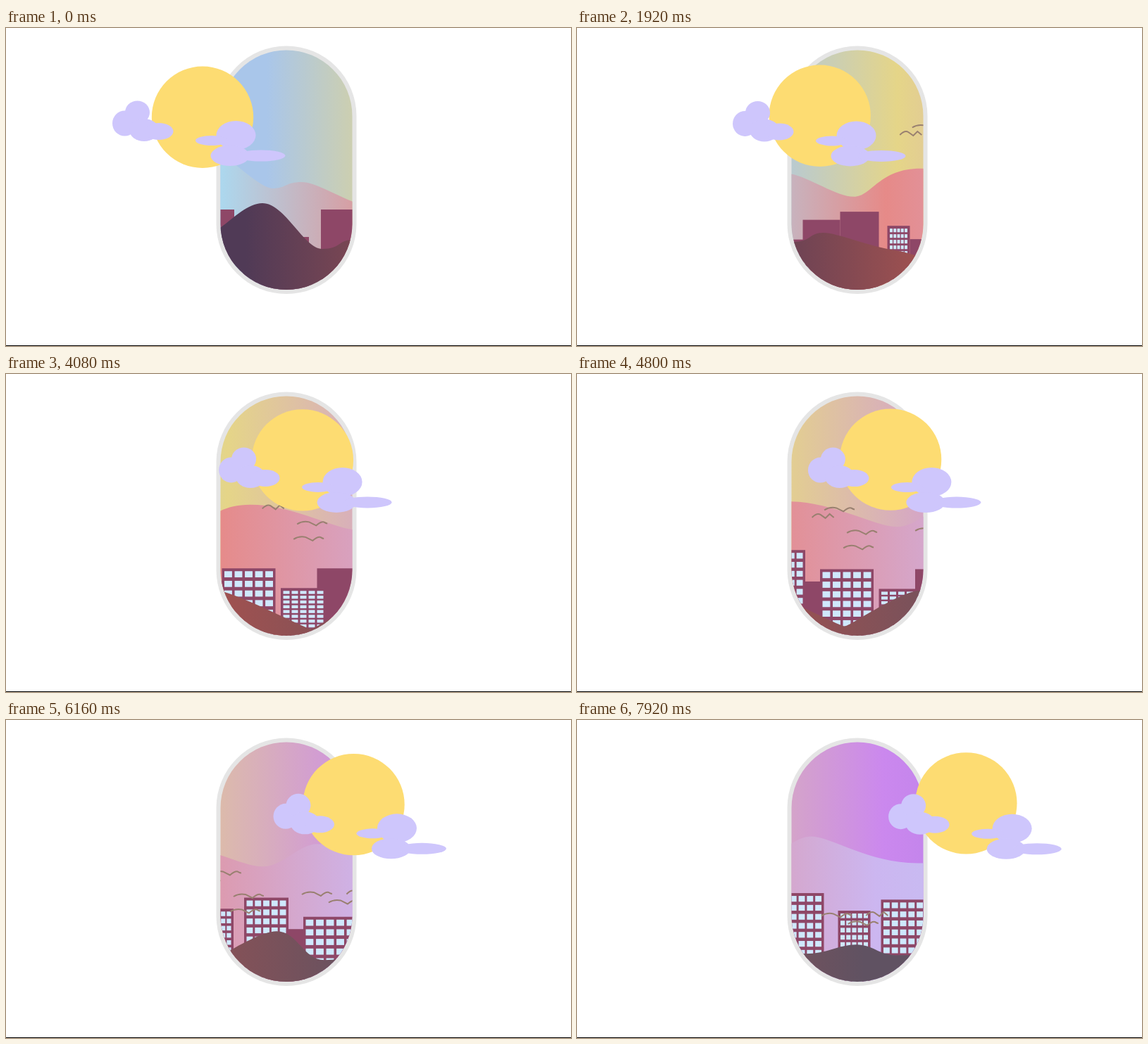
Write an HTML page with a canvas that moves like this. It is 802 by 452 pixels and loops after 8000 ms.

```html
<!DOCTYPE html>
<html lang="en">
<head>
<meta charset="utf-8">
<title>Window view</title>
<style>
html, body { margin: 0; width: 100%; height: 100%; overflow: hidden; background: #fff; }
canvas { display: block; }
</style>
</head>
<body>
<canvas id="stage" width="802" height="452"></canvas>
<script>
const ctx = document.getElementById('stage').getContext('2d');

// Crests and dips: x, y, roundness, optional slope
const ridge = terrain([
  [280, 163, 15], [378, 228, 20], [420, 219, 24], [515, 252, 26],
  [610, 212, 60], [762, 248, 30], [840, 216, 27], [990, 254, 68]
]);
const hill = terrain([
  [270, 300, 30], [364, 249, 32], [449, 314, 26], [492, 301, 20], [597, 326.5, 40, 0.14],
  [740, 384, 8], [849, 333, 30], [917, 374, 30], [989, 361, 24], [1045, 376, 24]
]);

// x, y, width, optional spacing of window rows
const BUILDINGS = [
  [447, 258, 100], [368, 297, 62], [269, 258, 55], [216, 269.5, 53], [60, 287, 23],
  [336, 278, 32, 8], [164.5, 297.5, 64, 6.8], [81, 269.5, 76, 13.7],
  [-3, 242.3, 63, 12.8], [-64, 258, 46, 10.2], [-147, 233, 63, 12.8]
];
const COLUMNS = 5, MARGIN = 3.5;

const BIRD = new Path2D('M0 1Q8-4 17-2L27 3Q34-3 38-2Q41 0 43 0');
const SMALL_BIRD = new Path2D('M0 2Q7-5 12-2L19 3L25-3L31 2');
const BIRDS = [[589.5, 139], [584.5, 160.5], [557.5, 106.5], [686.5, 136], [724.5, 147.5]];
const SMALL_BIRDS = [[540, 116], [750, 134.5]];

const PUFFS = [
  [168.5, 135.5, 17.5, 18], [186.5, 120, 17.5, 16.5], [196, 145, 21, 16], [217, 147, 20.5, 12],
  [326.5, 152.5, 28, 20.5], [292, 160, 23, 7], [318, 181.5, 27.5, 14.5], [362, 181.5, 34.5, 8]
];

const SKY = gradient([[370, '#a9c6ea'], [577, '#e5d588'], [942, '#cb88ee'], [1100, '#b880e8']]);
const MOUNTAINS = gradient([[300, '#abd9f0'], [560, '#e68a88'], [930, '#ccb6f0'], [1100, '#c4c0f4']]);
const SOIL = gradient([[340, '#503a56'], [625, '#9e5150'], [1000, '#605262']]);

const pane = new Path2D();
pane.roundRect(304.5, 31.5, 187, 340.5, 93.5);

function gradient(stops) {
  const g = ctx.createLinearGradient(300, 0, 1100, 0);
  for (const [x, color] of stops) g.addColorStop((x - 300) / 800, color);
  return g;
}

// Smooth outline from knot to knot, closed far below the window.
function terrain(knots) {
  const path = new Path2D();
  const [left, right] = [knots[0][0], knots.at(-1)[0]];
  path.moveTo(left, knots[0][1]);
  for (let k = 1; k < knots.length; k++) {
    const [x0, y0, r0, s0 = 0] = knots[k - 1];
    const [x1, y1, r1, s1 = 0] = knots[k];
    path.bezierCurveTo(x0 + r0, y0 + r0 * s0, x1 - r1, y1 - r1 * s1, x1, y1);
  }
  path.lineTo(right + 100, knots.at(-1)[1]);
  path.lineTo(right + 100, 600);
  path.lineTo(left, 600);
  path.closePath();
  return path;
}

function layer(x, y, draw) {
  ctx.save();
  ctx.translate(x, y);
  draw();
  ctx.restore();
}

function ellipse(x, y, rx, ry) {
  ctx.beginPath();
  ctx.ellipse(x, y, rx, ry, 0, 0, 2 * Math.PI);
  ctx.fill();
}

function building([x, y, width, spacing]) {
  ctx.fillStyle = '#8e4767';
  ctx.fillRect(x, y, width, 400 - y);
  if (!spacing) return;
  const pitch = (width - 2 * MARGIN) / (COLUMNS - 0.25);
  ctx.fillStyle = '#cfe8fd';
  for (let top = y + 4; top < 390; top += spacing)
    for (let col = 0; col < COLUMNS; col++)
      ctx.fillRect(x + MARGIN + col * pitch, top, 0.75 * pitch, 0.64 * spacing);
}

function flock(bird, spots) {
  for (const [x, y] of spots) layer(x, y, () => ctx.stroke(bird));
}

function scene(step) {
  ctx.fillStyle = '#fff';
  ctx.fillRect(0, 0, 802, 452);
  ctx.fillStyle = '#000';
  ctx.fillRect(0, 451, 802, 1);

  ctx.fillStyle = '#e5e5e5';
  ctx.beginPath();
  ctx.roundRect(298.5, 25.5, 199, 352.5, 99.5);
  ctx.fill();

  ctx.save();
  ctx.clip(pane);
  layer(-6.42 * step, -0.64 * step, () => {
    ctx.fillStyle = SKY;
    ctx.fillRect(280, 0, 800, 600);
    ctx.fillStyle = MOUNTAINS;
    ctx.fill(ridge);
  });
  layer(5.5 * step, 0.165 * step, () => BUILDINGS.forEach(building));
  layer(-7.5 * step, -0.53 * step, () => {
    ctx.fillStyle = SOIL;
    ctx.fill(hill);
  });
  layer(-4.3 * step, 1.79 * step, () => {
    ctx.strokeStyle = '#998070';
    ctx.lineWidth = 2;
    flock(BIRD, BIRDS);
    flock(SMALL_BIRD, SMALL_BIRDS);
  });
  ctx.restore();

  ctx.fillStyle = '#fddc72';
  ellipse(279 + 3.46 * step, 126.8 - 0.107 * step, 72.2, 72.2);
  ctx.fillStyle = '#cec6fc';
  layer(3.685 * step, 0.022 * step, () => PUFFS.forEach(p => ellipse(...p)));
}

// The scene advances in 100 ms steps, shown on an 80 ms beat.
const start = performance.now();
function tick() {
  const beat = Math.floor((performance.now() - start) % 8000 / 80);
  scene(Math.round(beat * 0.8));
  requestAnimationFrame(tick);
}
tick();
</script>
</body>
</html>
```
